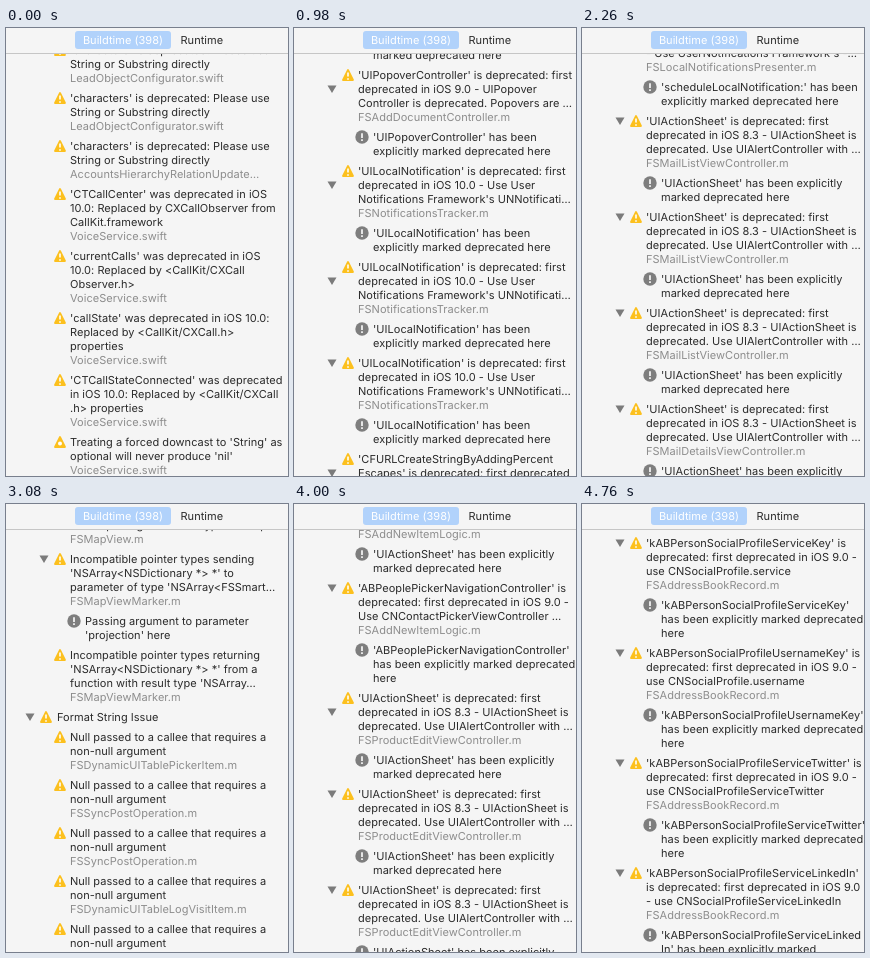
Animation of 282 by 448 pixels, one loop 4820 ms. Source, as an HTML page:

```html
<!DOCTYPE html>
<html lang="en">
<head>
<meta charset="utf-8">
<title>Issue navigator</title>
<style>
  html, body { margin: 0; width: 100%; height: 100%; overflow: hidden; background: #f5f5f5; }
  body { position: relative; font: 11px/14px Inter, "Open Sans", sans-serif; letter-spacing: .03px; text-rendering: geometricPrecision; color: #2b2b2b; }
  header { position: absolute; inset: 0 0 auto; height: 25px; background: #f5f5f5; border-bottom: 1px solid #c6c6c6; }
  header span { position: absolute; top: 5px; left: 174.5px; white-space: pre; }
  header .on { top: 3px; left: 69px; width: 96px; height: 18px; line-height: 18px; text-align: center; border-radius: 3px; background: #b1d2fb; color: #fff; }
  #list { position: absolute; top: 0; left: 0; width: 100%; will-change: transform; }
  .row { position: relative; padding: 3px 0 3px 64px; white-space: pre; }
  .note { padding-left: 79px; }
  .group { padding-left: 51px; }
  .file { color: #8d8d8d; }
  .row svg { position: absolute; left: 47px; top: 3px; width: 14px; height: 14px; }
  .note svg { left: 61px; }
  .group svg { left: 33px; }
  .row .fold { left: 31px; }
  .group .fold { left: 17px; }
  .low .fold { top: 17px; }
</style>
</head>
<body>
<svg width="0" height="0" style="position:absolute">
  <symbol id="warn" viewBox="0 0 14 14">
    <path d="M7 2 12 12H2Z" fill="#fcc01e" stroke="#fcc01e" stroke-width="1.8" stroke-linejoin="round"/>
    <path d="M7 4.6V8.6M7 10.2V11.7" stroke="#fff" stroke-width="1.6"/>
  </symbol>
  <symbol id="dot" viewBox="0 0 14 14">
    <path d="M7 2 12 12H2Z" fill="#fcc01e" stroke="#fcc01e" stroke-width="1.8" stroke-linejoin="round"/>
    <circle cx="7" cy="8.6" r="2" fill="#fff"/>
  </symbol>
  <symbol id="note" viewBox="0 0 14 14">
    <circle cx="7" cy="7" r="6.7" fill="#7e7e7e"/>
    <path d="M7 3.2V8M7 9.3V10.9" stroke="#fff" stroke-width="1.6"/>
  </symbol>
  <symbol id="fold" viewBox="0 0 14 14"><path d="M2.5 3.5h9L7 11Z" fill="#7b7b7b"/></symbol>
</svg>
<div id="list"></div>
<header><span class="on">Buildtime (398)</span><span>Runtime</span></header>
<script>
const LOOP = 4820, TICK = 58.1, PHASE = 12, LINE = 14;
const list = document.getElementById('list');
const at = {};
let html = '', height = 0;

const escapeHtml = s => s.replace(/</g, '&lt;');
const icon = (id, cls = '') => `<svg class="${cls}"><use href="#${id}"/></svg>`;
const times = (n, fn) => { for (let i = 0; i < n; i++) fn(i); };

// Scroll offset that puts the first line of the next row at height y
const mark = (name, y) => { at[name] = height + 10 - y; };

function row(kind, text, { file, fold, low, glyph = 'warn' } = {}) {
  const lines = text.split('\n').length + (file ? 1 : 0);
  html += `<div class="row ${kind}${low ? ' low' : ''}">${icon(glyph)}${fold ? icon('fold', 'fold') : ''}` +
    escapeHtml(text) + (file ? `\n<span class="file">${file}</span>` : '') + '</div>';
  height += lines * LINE + 6;
}
const warn = (text, file) => row('warn', text, { file });
const parent = (text, file, low) => row('warn', text, { file, low, fold: true });
const note = text => row('note', text, { glyph: 'note' });
const marked = name => note(name.length > 15
  ? `'${name}' has been\nexplicitly marked deprecated here`
  : `'${name}' has been explicitly\nmarked deprecated here`);
const markedLong = name => note(`'${name}'\nhas been explicitly marked deprecated\nhere`);

const characters = file => warn("'characters' is deprecated: Please use\nString or Substring directly", file);
function notification(file, low) {
  parent("'UILocalNotification' is deprecated: first\ndeprecated in iOS 10.0 - Use User\nNotifications Framework's UNNotificati…", file, low);
  marked('UILocalNotification');
}
function sheet(file, low) {
  parent("'UIActionSheet' is deprecated: first\ndeprecated in iOS 8.3 - UIActionSheet is\ndeprecated. Use UIAlertController with …", file, low);
  marked('UIActionSheet');
}
function popover(file) {
  parent("'UIPopoverController' is deprecated: first\ndeprecated in iOS 9.0 - UIPopover\nController is deprecated. Popovers are …", file, true);
  marked('UIPopoverController');
}
const record = (name, advice) =>
  parent(`'${name}' is\ndeprecated: first deprecated in iOS 9.0 -\nuse ${advice}`, 'FSAddressBookRecord.m');
function social(key, advice) {
  const name = 'kABPersonSocialProfile' + key;
  record(name, advice);
  markedLong(name);
}
function address(key, field) {
  record(`kABPersonAddress${key}Key`, `CNPostalAddress.${field}`);
  marked(`kABPersonAddress${key}Key`);
}
const nullPassed = file => warn('Null passed to a callee that requires a\nnon-null argument', file);

// Swift deprecations
times(2, () => characters('LeadObjectConfigurator.swift'));
mark('swift', 22);
times(2, () => characters('LeadObjectConfigurator.swift'));
characters('AccountsHierarchyRelationUpdate…');
const voice = 'VoiceService.swift';
warn("'CTCallCenter' was deprecated in iOS\n10.0: Replaced by CXCallObserver from\nCallKit.framework", voice);
warn("'currentCalls' was deprecated in iOS\n10.0: Replaced by <CallKit/CXCall\nObserver.h>", voice);
warn("'callState' was deprecated in iOS 10.0:\nReplaced by <CallKit/CXCall.h>\nproperties", voice);
warn("'CTCallStateConnected' was deprecated\nin iOS 10.0: Replaced by <CallKit/CXCall\n.h> properties", voice);
row('warn', "Treating a forced downcast to 'String' as\noptional will never produce 'nil'", { file: voice, glyph: 'dot' });
times(10, () => characters('LeadObjectConfigurator.swift'));
times(18, i => i % 3 ? sheet('FSAccountViewController.m') : popover('FSAddDocumentController.m'));

// Popovers and notifications
sheet('FSAddDocumentController.m');
mark('popover', 47);
popover('FSAddDocumentController.m');
times(3, i => notification('FSNotificationsTracker.m', i < 2));
parent("'CFURLCreateStringByAddingPercent\nEscapes' is deprecated: first deprecated\nin iOS 9.0 - Use [NSString stringByAdd…", 'FSURLEncoder.m', true);
marked('CFURLCreateStringByAddingPercent');
times(7, i => i % 2 ? sheet('FSAddressBookPicker.m') : notification('FSNotificationsTracker.m'));

// Address book
social('URLKey', 'CNSocialProfile.urlString');
mark('social', 39);
social('ServiceKey', 'CNSocialProfile.service');
social('UsernameKey', 'CNSocialProfile.username');
social('ServiceTwitter', 'CNSocialProfileServiceTwitter');
parent("'kABPersonSocialProfileServiceLinkedIn'\nis deprecated: first deprecated in iOS 9.0\n- use CNSocialProfileServiceLinkedIn", 'FSAddressBookRecord.m');
note("'kABPersonSocialProfileServiceLinked\nIn' has been explicitly marked\ndeprecated here");
times(3, () => social('ServiceFacebook', 'CNSocialProfileServiceFacebook'));
address('Street', 'street');
address('City', 'city');
address('State', 'state');
address('ZIP', 'postalCode');
mark('address', 91);
record('kABPersonAddressCountryKey', 'CNPostalAddress.country');
note("'kABPersonAddressCountryKey' has\nbeen explicitly marked deprecated …");
parent("'ABMultiValueRef' is deprecated: first\ndeprecated in iOS 9.0 - use NSArray of\nCNLabeledValue", 'FSAddressBookRecord.m');
marked('ABMultiValueRef');
parent("'ABRecordCopyValue' is deprecated: first\ndeprecated in iOS 9.0 - use CN object's\nproperties", 'FSAddressBookRecord.m');
marked('ABRecordCopyValue');
record('kABPersonAddressProperty', 'CNContact.postalAddresses');
marked('kABPersonAddressProperty');
times(5, () => sheet('FSAddNewItemLogic.m'));

// Pickers and action sheets
sheet('FSAddNewItemLogic.m');
mark('picker', 84);
parent("'ABPeoplePickerNavigationController' is\ndeprecated: first deprecated in iOS 9.0 -\nUse CNContactPickerViewController …", 'FSAddNewItemLogic.m');
markedLong('ABPeoplePickerNavigationController');
times(6, i => sheet('FSProductEditViewController.m', i === 0));
times(2, () => notification('FSLocalNotificationsPresenter.m'));
parent("'scheduleLocalNotification:' is\ndeprecated: first deprecated in iOS 10.0\n- Use UserNotifications Framework's -…", 'FSLocalNotificationsPresenter.m');
marked('scheduleLocalNotification:');
mark('sheets', 93);
times(3, () => sheet('FSMailListViewController.m'));
times(9, () => sheet('FSMailDetailsViewController.m'));

// Pointer types and null arguments
warn("Incompatible pointer types assigning to\n'id<MapDelegate>' from type 'FSMapView *'", 'FSMapView.m');
mark('format', 55);
parent("Incompatible pointer types sending\n'NSArray<NSDictionary *> *' to\nparameter of type 'NSArray<FSSmart…", 'FSMapViewMarker.m');
note("Passing argument to parameter\n'projection' here");
warn("Incompatible pointer types returning\n'NSArray<NSDictionary *> *' from a\nfunction with result type 'NSArray…", 'FSMapViewMarker.m');
row('group', 'Format String Issue', { fold: true });
nullPassed('FSDynamicUITablePickerItem.m');
times(2, () => nullPassed('FSSyncPostOperation.m'));
times(10, () => nullPassed('FSDynamicUITableLogVisitItem.m'));

list.innerHTML = html;

// Flicks down the list and back up: [tick, scroll offset]
const path = [
  [0, at.swift], [1, at.swift],
  [17, at.popover], [18, at.popover + 14], [19, at.popover + 14],
  [28, at.address], [29, at.address],
  [33, at.sheets - 72], [34, at.sheets - 72], [35, at.sheets - 70], [37, at.sheets - 70],
  [39, at.sheets], [46, at.format + 168], [47, at.format + 177], [49, at.format + 177],
  [53, at.format], [57, at.sheets + 500], [58, at.sheets + 500],
  [69, at.picker], [74, at.address], [75, at.address],
  [82, at.social], [84, at.social]
];

// Monotone cubic interpolation, flat at every pause and turn
const slope = i => (path[i + 1][1] - path[i][1]) / (path[i + 1][0] - path[i][0]);
const tangents = path.map((_, i) => {
  if (i === 0 || i === path.length - 1) return 0;
  const a = slope(i - 1), b = slope(i);
  return a * b > 0 ? 2 * a * b / (a + b) : 0;
});
function scrollAt(tick) {
  let i = 0;
  while (i < path.length - 2 && path[i + 1][0] <= tick) i++;
  const [t0, y0] = path[i], [t1, y1] = path[i + 1];
  const span = t1 - t0, u = (tick - t0) / span, v = 1 - u;
  return y0 * (1 + 2 * u) * v * v + y1 * u * u * (3 - 2 * u) +
    span * u * v * (tangents[i] * v - tangents[i + 1] * u);
}

function draw() {
  const tick = Math.floor((performance.now() % LOOP + PHASE) / TICK);
  list.style.transform = `translateY(${-Math.round(scrollAt(tick))}px)`;
  requestAnimationFrame(draw);
}
draw();
</script>
</body>
</html>
```
